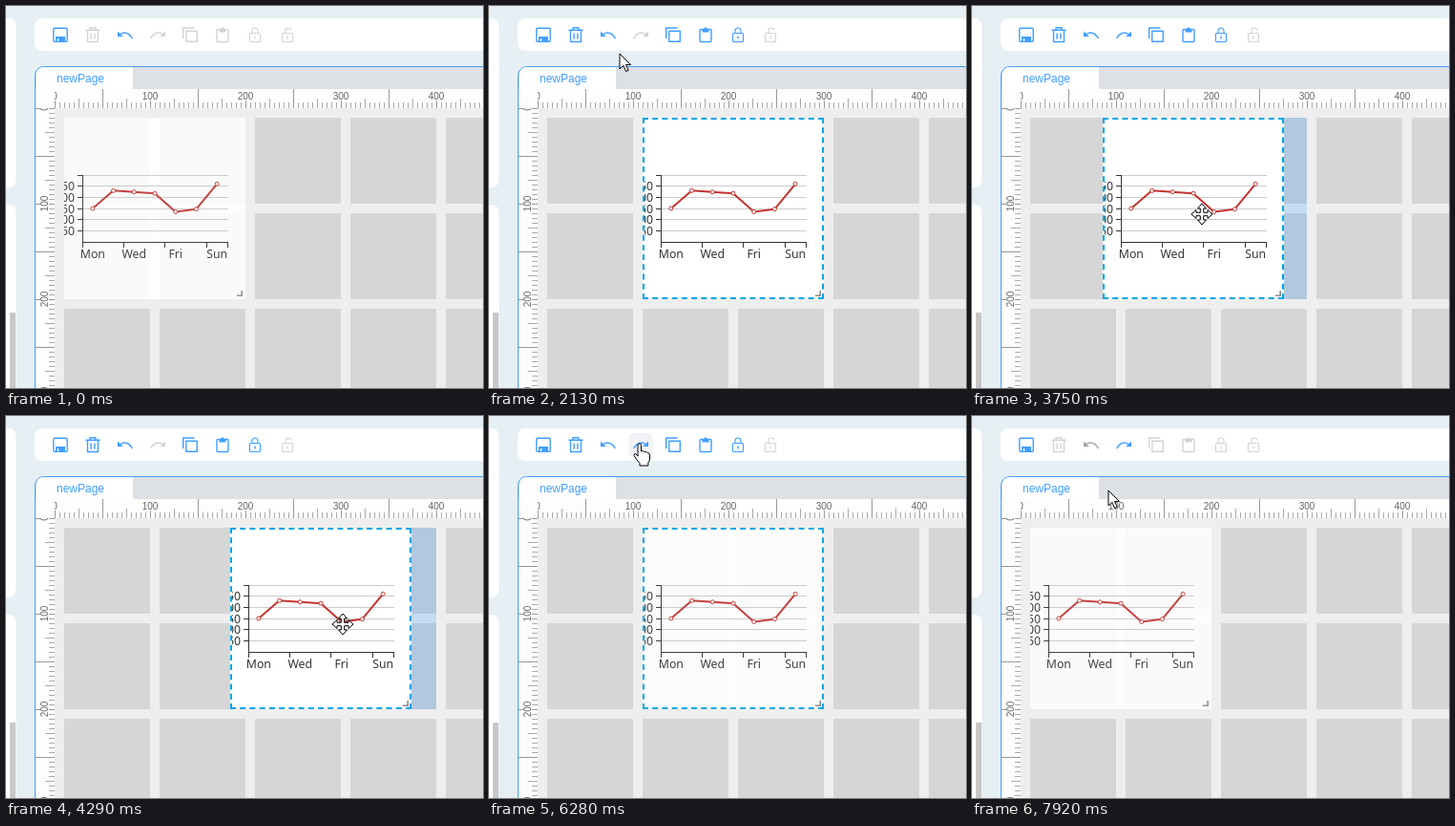
Animation of 500x400 px, one loop 7.99 s. Source, as an HTML page:

```html
<!DOCTYPE html>
<html lang="en">
<head>
<meta charset="utf-8">
<title>Page editor</title>
<style>
html, body { margin: 0; width: 100%; height: 100%; overflow: hidden; background: #e6eff3; }
svg { display: block; }
.icon { fill: none; stroke: currentColor; stroke-width: 1.4; stroke-linejoin: round; }
.icon .solid { fill: currentColor; stroke: none; }
.ruler { font: 10px "Liberation Sans", Arial, sans-serif; fill: #666; text-anchor: middle; }
.chart { font: 12.3px "Noto Sans", "Open Sans", sans-serif; fill: #333; }
.axis { fill: none; stroke: #333; }
.outline { box-sizing: border-box; width: 190px; height: 190px; border: 2px dashed #00a5e5; }
</style>
</head>
<body>
<svg width="500" height="400" viewBox="0 0 500 400">
  <defs>
    <clipPath id="cardClip"><rect width="190" height="190"/></clipPath>
    <clipPath id="topClip"><rect x="51" y="87" width="449" height="20"/></clipPath>
    <clipPath id="sideClip"><rect x="31" y="107" width="20" height="293"/></clipPath>
  </defs>

  <rect width="500" height="400" fill="#e6eff3"/>
  <g fill="#fff">
    <rect x="-20" y="13" width="30.5" height="177" rx="8"/>
    <rect x="-20" y="208" width="30.5" height="220" rx="8"/>
    <rect x="30" y="13" width="500" height="34" rx="8"/>
  </g>
  <rect x="4" y="321" width="6" height="79" fill="#c8c8c8"/>

  <rect x="30.5" y="63.5" width="500" height="400" rx="9" fill="#dde0e5" stroke="#409eff"/>
  <path d="M32 87V72Q32 64 40 64H133V87Z" fill="#fff"/>
  <text x="53" y="80" font-family="Liberation Sans, Arial, sans-serif" font-size="12" fill="#409eff">newPage</text>
  <path d="M31 87H500V107H51V400H31Z" fill="#fdfdfd"/>
  <rect x="51" y="107" width="449" height="293" fill="#eee"/>
  <g id="topRuler" class="ruler" clip-path="url(#topClip)"></g>
  <g id="sideRuler" class="ruler" clip-path="url(#sideClip)"></g>
  <g id="cells" fill="#d6d6d6"></g>

  <rect id="dropZone" y="117" width="190" height="190" fill="#1e90ff" fill-opacity=".2"/>
  <g id="card">
    <rect width="190" height="190" fill="#fff"/>
    <g id="chart" class="chart" clip-path="url(#cardClip)"></g>
    <path d="M186.2 181V186.2H181" fill="none" stroke="#8a8a8a" stroke-width="1.6"/>
    <g id="outline">
      <rect x="1" y="1" width="188" height="188" fill="none" stroke="#fff" stroke-width="2"/>
      <foreignObject width="190" height="190"><div class="outline"></div></foreignObject>
    </g>
  </g>

  <rect id="hover" y="18" width="25" height="25" rx="4" fill="#f1f3f6"/>
  <g id="toolbar"></g>

  <g id="cursor">
    <circle id="press" r="12" fill="#f8f000" fill-opacity=".62"/>
    <g stroke="#000" fill="#fff" stroke-linejoin="round">
      <path id="arrow" d="M0 0V16L3.8 12.4L6.6 18.5L9.2 17.3L6.5 11.4H11.5Z"/>
      <path id="hand" d="M-1 1.5Q-1 0 .8 0Q2.5 0 2.5 1.5V8Q5 6.8 5.8 8.7Q8.3 7.8 9 9.7Q11.5 9.3 11.5 12V16Q11.5 18 9.8 20V23H1V20.5Q-3.2 15.8-5 12.5Q-5.2 10.2-3.3 10.5L-1 13Z"/>
      <path id="move" d="M0-11L4.5-6H1.7V-1.7H6V-4.5L11 0L6 4.5V1.7H1.7V6H4.5L0 11L-4.5 6H-1.7V1.7H-6V4.5L-11 0L-6-4.5V-1.7H-1.7V-6H-4.5Z"/>
    </g>
  </g>
</svg>
<script>
const LOOP = 7990, CURSOR_ENTERS = 370, LAG = 80;
const BLUE = '#409eff', GREY = '#d3d3d3';
const $ = id => document.getElementById(id);
const show = (node, on) => node.setAttribute('visibility', on ? 'visible' : 'hidden');
const clamp = k => Math.min(1, Math.max(0, k));
const ease = k => k * k * (3 - 2 * k);

// Rulers: a tick every 5 px, longer ones at 25 and 50, labels at 100.
function buildRulers() {
  let across = '', down = '';
  for (let n = 0; n <= 450; n += 5) {
    const length = n % 50 === 0 ? 20 : n % 25 === 0 ? 10 : 6;
    const stroke = n % 50 === 0 ? '#999' : '#aaa';
    const x = 51 + n, y = 107 + n;
    across += `<path d="M${x + .5} 107v${n % 100 ? -length : -8}" stroke="${stroke}"/>`;
    down += `<path d="M51 ${y + .5}h${-length}" stroke="${stroke}"/>`;
    if (n % 100) continue;
    across += `<text x="${x}" y="97.5">${n}</text>`;
    down += `<rect x="36" y="${y - 9}" width="9" height="18" fill="#fdfdfd"/>
      <text transform="translate(44 ${y}) rotate(-90)">${n}</text>`;
  }
  $('topRuler').innerHTML = across;
  $('sideRuler').innerHTML = down;
}

function buildCells() {
  let out = '';
  for (let x = 61; x < 500; x += 100)
    for (let y = 117; y < 400; y += 100)
      out += `<rect x="${x}" y="${y}" width="90" height="90" rx="1"/>`;
  $('cells').innerHTML = out;
}

// Weekly line chart, in card coordinates.
function buildChart() {
  const values = [150, 230, 224, 218, 135, 147, 260];
  const slot = 152 / values.length;
  const yOf = v => 130 - v * 70 / 300;
  let out = '', dots = '';
  for (let v = 50; v <= 300; v += 50) {
    const y = Math.floor(yOf(v)) + .5;
    out += `<path d="M20 ${y}H172" stroke="#ccc"/><path class="axis" d="M14 ${y}H19"/>`;
    if (v < 300) out += `<text x="11" y="${y + 4}" text-anchor="end">${v}</text>`;
  }
  out += '<path class="axis" d="M19.5 60V131M19 130.5H172M171.5 131v5"/>';
  ['Mon', 'Wed', 'Fri', 'Sun'].forEach((day, i) => {
    const x = 19 + 2 * i * slot;
    out += `<path class="axis" d="M${Math.floor(x) + .5} 131v5"/>
      <text x="${x + slot / 2}" y="147" text-anchor="middle">${day}</text>`;
  });
  const points = values.map((v, i) => [19 + (i + .5) * slot, yOf(v)]);
  points.forEach(([x, y]) => dots += `<circle cx="${x}" cy="${y}" r="2"/>`);
  $('chart').innerHTML = `${out}<g stroke="#c23531" fill="#fff">
    <polyline points="${points.join(' ')}" fill="none" stroke-width="2" stroke-linejoin="bevel"/>${dots}</g>`;
}

// Icons are drawn around their own centre.
function buildToolbar() {
  const back = '<path d="M-5.5-.5Q2-5 7.5 4"/><path class="solid" d="M-8-3.5V2H-2.2Z"/>';
  const lock = '<rect x="-5.5" y="-1.5" width="11" height="9" rx="1" stroke-width="1.1"/><path d="M0 1.5V4.5"/>';
  const shapes = {
    save: '<rect x="-7.2" y="-6.7" width="14.4" height="14" rx="1"/><path class="solid" d="M-5 2H5V7H-5Z"/><path d="M-2.5 4V7" stroke="#fff"/>',
    remove: '<path d="M-7.5-4.7H7.5M-3-5V-7.3H3V-5M-5.5-4.5V7.5H5.5V-4.5M-1.9-1.5V4.7M1.9-1.5V4.7"/>',
    undo: back,
    redo: `<g transform="scale(-1 1)">${back}</g>`,
    copy: '<rect x="-4.2" y="-3.7" width="11.5" height="11"/><path d="M-7.3 4V-7H4.5"/>',
    paste: '<rect x="-6" y="-5.5" width="12" height="13" rx="1"/><path class="solid" d="M-3.5-5.5H-2Q0-10 2-5.5H3.5V-2.5H-3.5Z"/>',
    lock: lock + '<path d="M-3-1.5V-4Q-3-7 0-7Q3-7 3-4V-1.5" stroke-width="1.1"/>',
    unlock: lock + '<path d="M-2-1.5V-4Q-2-7 1-7Q3.5-7 4-4.5" stroke-width="1.1"/>'
  };
  $('toolbar').innerHTML = Object.keys(shapes).map((name, i) =>
    `<g id="${name}" class="icon" transform="translate(${57 + 34 * i} 30)">${shapes[name]}</g>`).join('');
}

// Steps of the session; each one changes the state as far as time t allows.
function glide(s, x, y, k) {
  s.x += (x - s.x) * k;
  s.y += (y - s.y) * k;
}

const travel = (start, end, x, y) => ({ start, play(s, t) {
  glide(s, x, y, ease(clamp((t - start) / (end - start))));
} });

const drag = (start, end, x, y) => ({ start, play(s, t) {
  const grab = s.x - s.cardX;
  glide(s, x, y, clamp((t - start - LAG) / (end - start - LAG)));
  s.pressed = t < end;
  s.dragging = t >= start + LAG && t < end + LAG;
  s.cardX = s.x - grab;
  s.column = Math.round((s.cardX - 66) / 100);
  if (t >= end + LAG) {
    s.history = [...s.history.slice(0, s.index + 1), s.column];
    s.index++;
    settle(s);
  }
} });

const click = (change, start, hold = 70) => ({ start, play(s, t) {
  s.pressed = t < start + hold;
  if (s.pressed) return;
  s.index += change;
  settle(s);
} });

function settle(s) {
  s.column = s.history[s.index];
  s.cardX = 61 + 100 * s.column;
}

const UNDO = -1, REDO = 1;
const steps = [
  travel(370, 520, 191, 189),
  travel(670, 820, 169, 213),
  drag(820, 1440, 241, 214),
  travel(1520, 2290, 124, 30),
  click(UNDO, 2520),
  travel(2980, 3340, 165, 222),
  drag(3360, 3750, 241, 218),
  travel(3900, 3980, 279, 218),
  drag(3980, 4280, 353, 218),
  travel(4370, 5370, 124, 29),
  click(UNDO, 5440),
  click(UNDO, 5590),
  travel(5740, 5980, 157, 29),
  click(REDO, 6210),
  click(REDO, 6590, 150),
  travel(7060, 7300, 121, 29),
  click(UNDO, 7370),
  click(UNDO, 7690),
  travel(7760, 7900, 143, 78)
];

function stateAt(t) {
  const s = { x: 241, y: 272, cardX: 61, column: 0, history: [0], index: 0, pressed: false, dragging: false };
  steps.filter(step => step.start <= t).forEach(step => step.play(s, t));
  s.selected = s.dragging || s.column > 0;
  return s;
}

// Selection fades: average it over the last moments.
function cardOpacity(t) {
  const recent = [0, 40, 80, 120].filter(ago => stateAt(t - ago).selected);
  return .9 + .025 * recent.length;
}

function draw(t) {
  const s = stateAt(t);
  const x = Math.round(s.x), y = Math.round(s.y), cardX = Math.round(s.cardX);

  $('card').setAttribute('transform', `translate(${cardX} 117)`);
  $('card').setAttribute('opacity', cardOpacity(t));
  show($('outline'), s.selected);
  show($('dropZone'), s.dragging);
  $('dropZone').setAttribute('x', 61 + 100 * s.column);

  // At most two steps can be undone.
  const undone = s.history.length - 1 - s.index;
  const tint = (name, on, off = GREY) => $(name).style.color = on ? BLUE : off;
  ['remove', 'copy', 'paste', 'lock'].forEach(name => tint(name, s.selected));
  tint('save', true);
  tint('unlock', false);
  tint('undo', undone < 2, '#a5a5a5');
  tint('redo', undone > 0);

  const visible = t >= CURSOR_ENTERS;
  const button = [125, 159].find(cx => Math.abs(x - cx) < 13 && Math.abs(y - 30) < 13);
  const overCard = s.selected && x > cardX && x < cardX + 190 && y > 117 && y < 307;
  const shape = button ? 'hand' : overCard ? 'move' : 'arrow';
  ['arrow', 'hand', 'move'].forEach(name => show($(name), visible && name === shape));
  show($('hover'), visible && button);
  if (button) $('hover').setAttribute('x', button - 12.5);
  show($('press'), s.pressed);
  $('cursor').setAttribute('transform', `translate(${x} ${y})`);
}

buildRulers();
buildCells();
buildChart();
buildToolbar();

const start = performance.now();
function tick() {
  draw((performance.now() - start) % LOOP);
  requestAnimationFrame(tick);
}
tick();
</script>
</body>
</html>
```
